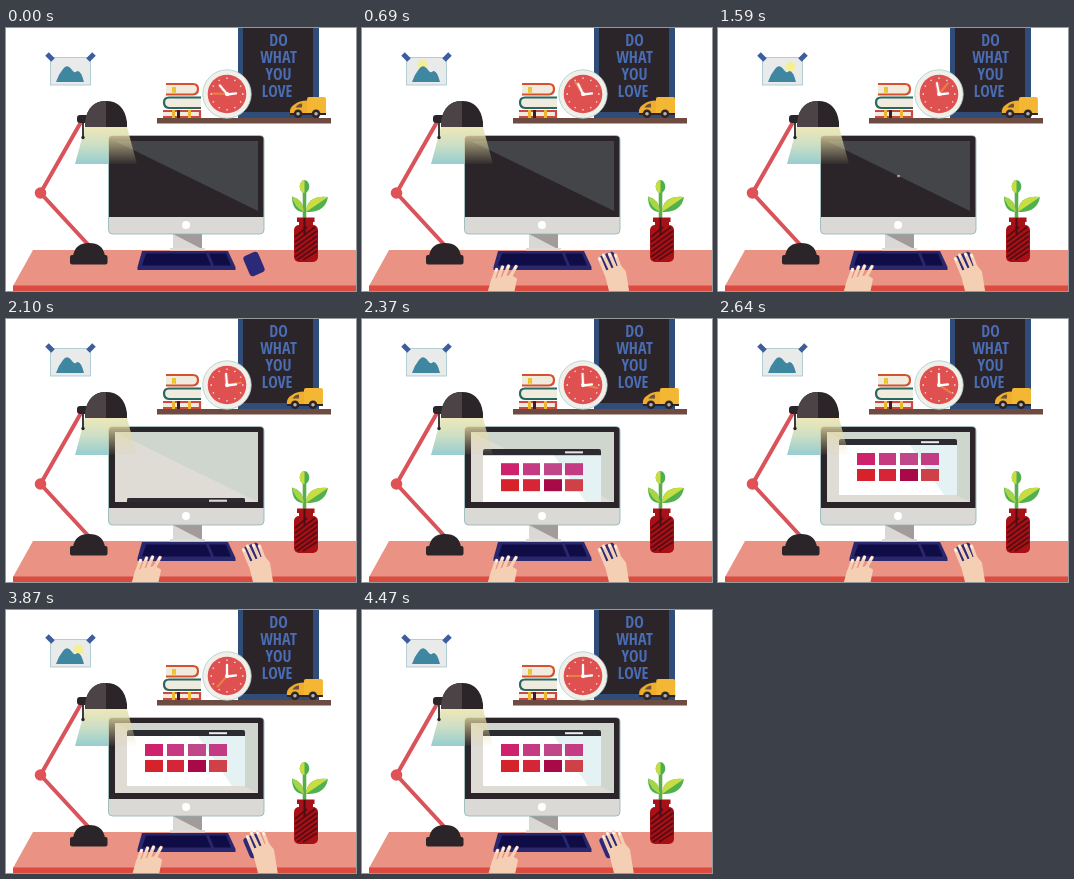
These frames come from a looping animation (350 px wide and 263 px high, 4.5 s). An HTML page without scripts:

```html
<!DOCTYPE html>
<html lang="en">
<head>
<meta charset="utf-8">
<title>Desk at work</title>
<style>
html, body { margin: 0; width: 100%; height: 100%; overflow: hidden; background: #fff; }
svg { display: block; width: 100%; height: 100%; }
.ink { fill: #2b2529; }
.red { fill: #de5150; }
.skin { fill: #f5cfb3; stroke: #f5cfb3; }
.navy { fill: #2c2a78; }
.poster { font: 700 16px "Open Sans Condensed", "Roboto Condensed", "Open Sans", Roboto, sans-serif; font-stretch: 75%; fill: #4a6cb3; text-anchor: middle; }

.sun { animation: sun 2.25s linear infinite; }
@keyframes sun {
  0%, 17.3% { transform: translate(62px, 49px); }
  30.7% { transform: translate(60.5px, 37px); }
  50% { transform: translate(66px, 34px); }
  71.3% { transform: translate(72.5px, 39px); }
  91%, 100% { transform: translate(70px, 52px); }
}
.truck { animation: truck .75s linear infinite; }
@keyframes truck {
  0% { transform: translateX(7px); }
  4% { transform: translateX(8px); }
  8% { transform: translateX(12px); }
  12% { transform: translateX(7px); }
  16% { transform: translateX(4px); }
  24%, 56% { transform: none; }
  80% { transform: translateX(4px); }
  92%, 96% { transform: none; }
  100% { transform: translateX(7px); }
}
.hour, .second { transform-origin: 221px 66px; }
.hour { animation: hour 4.5s ease-out infinite; }
@keyframes hour {
  0% { transform: rotate(-40deg); }
  65%, 100% { transform: none; }
}
.second { animation: second 4.5s linear infinite; }
@keyframes second {
  from { transform: rotate(-88deg); }
  to { transform: rotate(272deg); }
}
.arrive { animation: arrive 4.5s infinite; }
@keyframes arrive {
  0%, 3% { transform: translateY(46px); animation-timing-function: ease-out; }
  13.3%, 100% { transform: none; }
}
.right { animation: right 4.5s infinite; }
@keyframes right {
  0%, 62% { transform: none; }
  70%, 100% { transform: translate(4px, -4px); }
}
.left { animation: left 4.5s infinite; }
@keyframes left {
  0%, 62% { transform: none; }
  70%, 100% { transform: translate(1px, -1px); }
}
.glow { transform-origin: 180.5px 148px; animation: glow 4.5s infinite; }
@keyframes glow {
  0%, 34.4% { transform: scale(0); animation-timing-function: ease-in-out; }
  44%, 100% { transform: none; }
}
.page { animation: page 4.5s infinite; }
@keyframes page {
  0%, 46% { transform: translateY(66px); animation-timing-function: ease-out; }
  56%, 100% { transform: none; }
}
</style>
</head>
<body>
<svg viewBox="0 0 350 263" preserveAspectRatio="none">
  <defs>
    <linearGradient id="beam" x2="0" y2="1">
      <stop stop-color="#eee8b8"/><stop offset=".45" stop-color="#cfe0c4"/><stop offset="1" stop-color="#96cdd0"/>
    </linearGradient>
    <linearGradient id="spill" x2="0" y2="1">
      <stop stop-color="#f0e8b4"/><stop offset=".4" stop-color="#e6dca4" stop-opacity=".62"/><stop offset="1" stop-color="#e0d8a8" stop-opacity=".04"/>
    </linearGradient>
    <clipPath id="screen"><path d="M109 113H252V183H109Z"/></clipPath>
    <clipPath id="body"><path d="M102 107H258V206H102Z"/></clipPath>
    <clipPath id="photo"><path d="M47 32H82V54H47Z"/></clipPath>
    <clipPath id="jar"><rect x="288" y="197" width="24" height="37" rx="5"/></clipPath>
    <path id="cone" d="M79 99H121L131 136H69Z"/>
    <path id="tick" d="M221 49.5V51" stroke="#f7e9e0" stroke-width="1.3"/>
    <g id="quarter">
      <use href="#tick"/><use href="#tick" transform="rotate(30 221 66)"/><use href="#tick" transform="rotate(60 221 66)"/>
    </g>
    <g id="wheel"><circle r="4.3" class="ink"/><circle r="1.8" fill="#b9b4ad"/></g>
  </defs>

  <!-- Pinned photo -->
  <rect x="44.5" y="29.5" width="40" height="27.5" fill="#e8ebea" stroke="#a3c4cc" stroke-width=".8"/>
  <g clip-path="url(#photo)">
    <circle class="sun" r="5" fill="#f5ee92"/>
    <path d="M50 54Q52 47 57 41Q61 35 66 42Q69 46 71 43Q75 42 78 54Z" fill="#3f87a1"/>
  </g>
  <path d="M41 26L47 32M88 26L82 32" stroke="#3d5d9d" stroke-width="5"/>

  <!-- Poster -->
  <path d="M232 0H313V90H232Z" fill="#304c79"/>
  <path class="ink" d="M237 0H307V84H237Z"/>
  <g class="poster">
    <text x="272.500" y="18">DO</text>
    <text x="272.500" y="35">WHAT</text>
    <text x="272.500" y="51.500">YOU</text>
    <text x="271" y="68.500">LOVE</text>
  </g>

  <!-- Shelf and books -->
  <path d="M151 90H325V95.500H151Z" fill="#6d4b40"/>
  <g fill="#f0ebdf" stroke-width="2.200">
    <path d="M160 56H187Q192 56 192 61T187 66.500H160" stroke="#d8512f"/>
    <path d="M195 69.500H163Q158 69.500 158 74.500T163 80H195" stroke="#28685e"/>
    <path d="M157 83H194V89H157" stroke="#cf4940"/>
  </g>
  <path d="M166 59V66L168 64L170 66V59Z" fill="#efc52f"/>
  <path d="M166 82H169V90H166ZM182 82H185V90H182Z" fill="#efb52f"/>
  <path class="ink" d="M171 82H174V90H171Z"/>

  <!-- Clock -->
  <circle cx="221" cy="66" r="24.200" fill="#f1efe9" stroke="#a9cdcb" stroke-width=".8"/>
  <circle class="red" cx="221" cy="66" r="19.300"/>
  <use href="#quarter"/><use href="#quarter" transform="rotate(90 221 66)"/>
  <use href="#quarter" transform="rotate(180 221 66)"/><use href="#quarter" transform="rotate(270 221 66)"/>
  <g stroke="#fff" stroke-width="2.300" stroke-linecap="round">
    <path class="second" d="M221 66V51.500" stroke="#f0a040" stroke-width="1.200"/>
    <path d="M221 66.500L230 65.300"/>
    <path class="hour" d="M221 67V55"/>
  </g>
  <circle cx="221" cy="66" r="2" fill="#fff"/>

  <!-- Truck -->
  <g class="truck">
    <path d="M294 71Q294 69 296 69H311Q313 69 313 71V86H294Z" fill="#f4b733"/>
    <path d="M277 86V82Q278 78 282 76Q286 72.500 294 72.500V86Z" fill="#efae2e"/>
    <path d="M282.500 79.500Q285 75.500 289 75.500V79.500Z" fill="#6b5138"/>
    <path class="ink" d="M277 85H313V87H277Z"/>
    <use href="#wheel" x="285" y="85.800"/>
    <use href="#wheel" x="303" y="85.800"/>
  </g>

  <!-- Desk -->
  <path d="M27 222H350V258H7Z" fill="#ea9384"/>
  <path d="M7 257.500H350V263H7Z" fill="#dc4b40"/>

  <!-- Computer -->
  <use href="#cone" fill="url(#beam)"/>
  <path d="M167 205H196V221H167Z" fill="#dad8d4"/>
  <path d="M167 206H196V221Z" fill="#a29b99"/>
  <path d="M164 220H199V222.500H164Z" fill="#dedcd8"/>
  <rect x="102.500" y="107.500" width="155.500" height="98.500" rx="4" fill="#dbd9d5" stroke="#8fb4b4" stroke-width=".8"/>
  <path class="ink" d="M103 189V111Q103 108 106 108H254Q257.500 108 257.500 111V189Z"/>
  <circle cx="180" cy="197" r="4" fill="#fff"/>
  <path d="M109 113H252V183Z" fill="#434549"/>
  <g clip-path="url(#screen)">
    <g class="glow">
      <path d="M109 113H252V183H109Z" fill="#dfdbd5"/>
      <path d="M109 113H252V183Z" fill="#cfd6cd"/>
    </g>
    <g class="page">
      <path d="M121 124H239V176H121Z" fill="#fff"/>
      <path d="M192 126H239V176H226Z" fill="#e5f2f3"/>
      <path d="M121 126V122Q121 120 123 120H237Q239 120 239 122V126Z" fill="#2c2b31"/>
      <path d="M203 123.200H221" stroke="#eee" stroke-width="2"/>
      <g stroke-width="12">
        <path d="M139 140H157" stroke="#cf226d"/><path d="M161 140H178" stroke="#c63a84"/>
        <path d="M182 140H200" stroke="#c04789"/><path d="M203 140H221" stroke="#c33b83"/>
        <path d="M139 156H157" stroke="#d5222b"/><path d="M161 156H178" stroke="#d62536"/>
        <path d="M182 156H200" stroke="#a80a48"/><path d="M203 156H221" stroke="#cf4048"/>
      </g>
    </g>
  </g>
  <use href="#cone" fill="url(#spill)" clip-path="url(#body)"/>

  <!-- Lamp -->
  <path d="M82.500 217L34.500 165L75 94" fill="none" stroke="#d9535a" stroke-width="4"/>
  <circle cx="34.500" cy="165" r="5.800" fill="#df5356"/>
  <path class="ink" d="M67 228Q69 215 83 215T99 228Z"/>
  <rect class="ink" x="64" y="227" width="37.500" height="9.500" rx="2"/>
  <rect class="ink" x="71" y="87" width="12" height="8" rx="3"/>
  <path d="M77 94V110" stroke="#2b2529" stroke-width="1.800"/>
  <circle class="ink" cx="77" cy="109.500" r="1.700"/>
  <path class="ink" d="M79 99V94Q82 73 100 73T121 94V99Z"/>
  <path d="M79 99V94Q82 73 100 73V99Z" fill="#4b4345"/>

  <!-- Keyboard and mouse -->
  <path d="M136 223H222L229.500 239V242H131.500V239Z" fill="#29276d"/>
  <path d="M140 225.500H200L205 237.500H136ZM203 225.500H220L225 237.500H208Z" fill="#100d46"/>
  <rect class="navy" x="240" y="225" width="16" height="22" rx="3.500" transform="rotate(-23 248 236)"/>

  <!-- Plant -->
  <path d="M298.500 191V164" stroke="#5aad4c" stroke-width="3.600"/>
  <path d="M298 184Q286 184 286 168.500Q297 171 298 184Z" fill="#4daf51"/>
  <path d="M298 184Q288 179 286 168.500Q297 171 298 184Z" fill="#a6d545"/>
  <path d="M300 184Q301 167 322 169Q319 185 300 184Z" fill="#51b04f"/>
  <path d="M300 184Q301 167 322 169Z" fill="#c8dd42"/>
  <ellipse cx="298.500" cy="158.500" rx="4.800" ry="6.500" fill="#4daf51"/>
  <path d="M298.500 152A4.800 6.500 0 0 0 298.500 165Z" fill="#c8dd42"/>
  <path d="M291 189.500H308.500V194H291ZM293 193H307V199H293Z" fill="#a61218"/>
  <g clip-path="url(#jar)">
    <path d="M288 197H312V234H288Z" fill="#a81016"/>
    <path d="M289 209L301 199M289 214L309 199M289 219L311 203M289 224L311 208M289 229L311 213M291 232L311 218M297 232L311 223" stroke="#560c12" stroke-width="1.700"/>
  </g>
  <path d="M298.500 190V207" stroke="#4a0f14" stroke-width="2"/>

  <!-- Hands -->
  <g class="arrive" stroke-linecap="round" stroke-linejoin="round">
    <g class="left">
      <path class="skin" d="M130 252L149 248L154 251L150 270H125Z" stroke-width="2"/>
      <path class="skin" d="M131 252L134.500 241.500M136.500 250L140.500 239M142 249L146.500 238M147.500 250L154 238.500" stroke-width="3.400"/>
      <path d="M134.200 242.500L134.800 241M140 240.500L140.600 239M145.800 239.500L146.500 238M153 240L153.800 238.700" stroke="#fff3ea" stroke-width="2"/>
    </g>
    <g class="right">
      <path class="skin" d="M243 244L258 238L263 244L268 275H251L245 251Z" stroke-width="2"/>
      <path class="skin" d="M244 246L237.500 230.500M249 243L241.500 227M254 241L247.500 226M258.500 241L253.500 227" stroke-width="3.400"/>
      <path d="M238 232L237.300 230.500M242 228.500L241.300 227M248 227.500L247.300 226M254 228.500L253.400 227" stroke="#fff3ea" stroke-width="2"/>
    </g>
  </g>
</svg>
</body>
</html>
```
